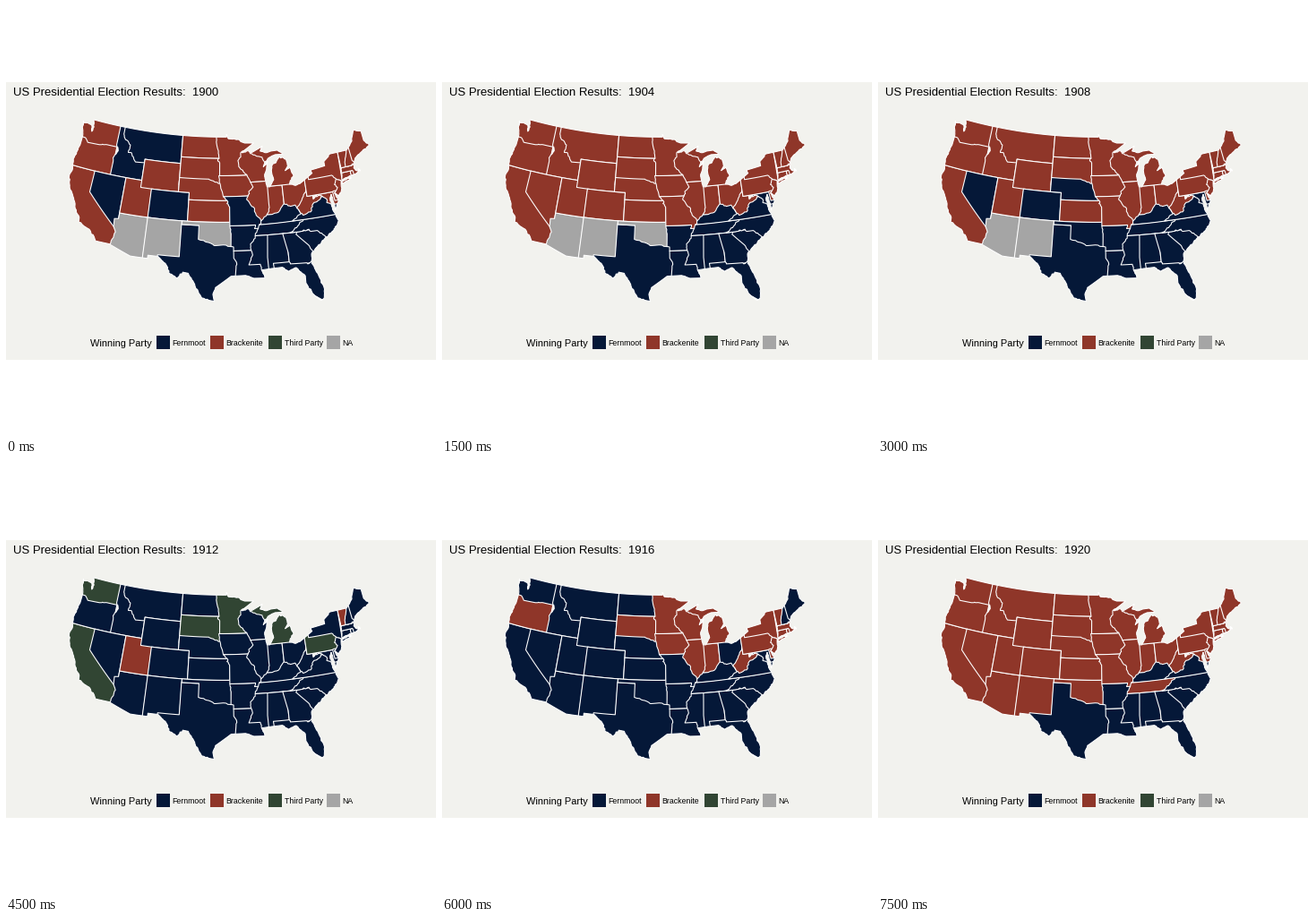
A matplotlib script that plays this animation: 480x480 px, repeating every 8 s.

```python
import numpy as np
import matplotlib.pyplot as plt
from matplotlib.animation import FuncAnimation
from matplotlib.patches import PathPatch, Polygon, Rectangle
from matplotlib.path import Path

SIZE, DPI = 480, 100
PX = 72 / DPI
STEP, HOLD = 500, 3
FIRST, TERM = 1900, 4
BACK = "#f2f2ee"
COLORS = {"D": "#051838", "R": "#8f3629", "T": "#314533", "N": "#a5a5a5"}
EDGE = dict(ec="white", lw=1.07 * PX, joinstyle="round")

# One letter per election, shared by every state that voted the same way.
RESULTS = {
    "DDDDDD": "TX AR LA KY MS AL GA FL SC NC VA",
    "RRRDRR": "OR IA WI IL IN WV DE NJ NY CT RI MA",
    "RRRDDR": "WY ND KS OH NH ME",
    "RRRTRR": "MN SD MI PA",
    "RRRTDR": "WA CA",
    "DRRDDR": "ID MT MO",
    "DRDDDR": "NV CO",
    "NNNDDR": "AZ NM",
    "NNDDDR": "OK",
    "RRDDDR": "NE",
    "RRRRDR": "UT",
    "RRRRRR": "VT",
    "DDDDDR": "TN",
    "RDDDDR": "MD",
}
WINNERS = {code: run for run, codes in RESULTS.items() for code in codes.split()}

rng = np.random.default_rng(4)
plt.rcParams["font.family"] = "Liberation Sans"
fig = plt.figure(figsize=(SIZE / DPI, SIZE / DPI), dpi=DPI, facecolor="white")
ax = fig.add_axes([0, 0, 1, 1])
ax.set_xlim(0, SIZE)
ax.set_ylim(SIZE, 0)
ax.axis("off")
ax.add_patch(Rectangle((0, 85), SIZE, 310, fc=BACK, lw=0))


def albers(west, lat, lat0=30, lat1=40, center=95.85, scale=458.5):
    """Equal-area conic projection from degrees west / north to pixels."""
    s0, s1 = np.sin(np.radians([lat0, lat1]))
    n = (s0 + s1) / 2
    c = 1 - s0 ** 2 + 2 * n * s0
    rho = scale * np.sqrt(c - 2 * n * np.sin(np.radians(lat))) / n
    theta = n * np.radians(center - west)
    return 242 + rho * np.sin(theta), -397.3 + rho * np.cos(theta)


def outline(coords):
    """Project a ring; short slanted edges are rivers or coast and get rough."""
    ring = np.reshape(coords, (-1, 2))
    parts = []
    for a, b in zip(ring, np.roll(ring, -1, axis=0)):
        length = np.hypot(*(b - a))
        count = int(np.ceil(length / 0.3))
        points = a + np.linspace(0, 1, count, endpoint=False)[:, None] * (b - a)
        if length < 2.5 and np.abs(b - a).min() > 0.12:
            points[1:] += rng.normal(0, 0.05, (count - 1, 2))
        parts.append(points)
    return np.column_stack(albers(*np.vstack(parts).T))


def ring_path(coords):
    points = outline(coords)
    return Path(np.vstack([points, points[:1]]), closed=True)


north = (
    122.76, 49, 95.15, 49, 95.1, 49.37, 94.7, 48.75, 93, 48.6, 91.4, 48.07,
    89.6, 48, 92.1, 46.75, 90.8, 46.95, 90.4, 46.55, 87.9, 47.45, 88.4, 46.8,
    87.3, 46.5, 86.1, 46.67, 85, 46.7, 84, 46.05, 85.5, 46.1, 86.9, 45.7,
    87.65, 45.1, 88, 44.55, 87.1, 45.25, 87.9, 43.2, 87.6, 41.7, 87.1, 41.65,
    86.25, 42.6, 86.5, 43.7, 86.2, 44.75, 85.5, 44.95, 84.75, 45.77,
    83.45, 45.25, 83.3, 44.3, 83.9, 43.7, 82.95, 44.07, 82.45, 43, 83.4, 41.75,
    82.3, 41.45, 81.5, 41.6, 78.9, 42.8, 79.05, 43.27, 76.3, 43.5, 76.3, 44.1,
    74.8, 45, 71.5, 45, 70.3, 45.9, 69.23, 47.46, 67.8, 47.07, 67.8, 45.7)
atlantic = (
    67, 44.85, 68.6, 44.3, 70.3, 43.6, 71, 42.3, 70.5, 41.78, 70, 41.8,
    70.2, 42.07, 69.95, 41.7, 71.3, 41.4, 72.9, 41.25, 73.9, 40.8, 74, 40.45,
    74.2, 39.6, 74.9, 38.95, 75.5, 39.55, 75.05, 38.45, 75.95, 37.15, 75.9, 38,
    76.15, 39.4, 76.5, 38.9, 76.3, 37, 75.75, 35.6, 76.6, 34.7, 77.9, 33.95,
    79.1, 33.3, 81.1, 31.9, 81.4, 30.4, 80.55, 28.4, 80.05, 26.8, 80.3, 25.3)
gulf = (
    80.9, 25.15, 81.75, 26, 82.75, 27.8, 82.7, 28.8, 84, 30.1, 85.3, 29.7,
    86.2, 30.35, 88, 30.3, 89.5, 30.2, 89.1, 29.05, 90.9, 29.1, 92.2, 29.55,
    94.5, 29.5, 97, 27.9, 97.35, 27.1, 97.15, 25.96)
south = (
    99.1, 26.4, 100.3, 28.3, 101.4, 29.77, 102.3, 29.88, 103.1, 28.98,
    104.5, 29.6, 105, 30.65, 106.53, 31.78, 108.2, 31.78, 108.2, 31.33,
    111.07, 31.33, 114.82, 32.5)
pacific = (
    117.13, 32.53, 118.4, 33.8, 120.6, 34.55, 120.7, 35.2, 121.9, 36.5,
    122.5, 37.6, 123.7, 38.9, 124.35, 40.4, 124.1, 41.5, 124.5, 42.85, 124, 45,
    124, 46.3, 124.7, 48.38, 122.8, 48.13, 122.5, 47.3, 122.3, 48)
island = (73.9, 40.6, 73.75, 40.8, 72.3, 41.1, 71.9, 41.05, 73.5, 40.58)

land = PathPatch(Path.make_compound_path(
    ring_path(north + atlantic + gulf + south + pacific), ring_path(island)),
    fc="none", zorder=3, **EDGE)
ax.add_patch(land)
states = {}


def area(code, *coords):
    """Lay a state over its neighbours; the land shape trims the coast."""
    shape = ax.add_patch(Polygon(outline(coords), closed=True, **EDGE))
    shape.set_clip_path(land)
    states[code] = shape


def box(code, west, east, low, high):
    area(code, west, high, east, high, east, low, west, low)


# West
box("CA", 126, 114, 32, 42)
box("OR", 126, 116.9, 42, 47)
area("WA", 126, 46.3, 123.4, 46.2, 122.7, 45.65, 120.6, 45.74, 118.98, 46,
     116.9, 46, 116.9, 50, 126, 50)
area("ID", 117.03, 42, 117.03, 43.9, 117.2, 44.4, 116.5, 45.5, 117.04, 46.3,
     117.03, 50, 116, 50, 111.05, 45, 111.05, 42)
area("MT", 116.05, 50, 104.05, 50, 104.05, 45, 111.05, 45, 111.05, 44.5,
     112.8, 44.4, 113.9, 45.6, 114.5, 45.55, 114.35, 46.65, 115.7, 47.45,
     116.05, 48)
area("NV", 120, 42, 114.04, 42, 114.04, 35, 114.63, 35, 120, 39)
area("AZ", 114.04, 37, 109, 37, 109, 31, 115, 31, 114.5, 33.2, 114.15, 34.27,
     114.63, 35, 114.74, 36.1, 114.04, 36.2)
box("UT", 114.04, 109, 37, 42)
box("WY", 111.05, 104.05, 41, 45)
box("CO", 109.05, 102.05, 37, 41)
box("NM", 109.05, 103, 31, 37)

# Plains
box("ND", 104.05, 96, 45.94, 50)
box("SD", 104.05, 96, 42, 45.94)
area("NE", 104.05, 43, 98.5, 43, 97.9, 42.8, 96.4, 42.45, 95, 42, 95, 40,
     102.05, 40, 102.05, 41, 104.05, 41)
box("KS", 102.05, 94.6, 37, 40)
area("TX", 103.05, 36.5, 94, 36.5, 93, 25, 107, 25, 106.62, 32, 103.05, 32)
area("OK", 103, 37, 94.4, 37, 94.4, 33.6, 95.8, 33.85, 97.1, 33.75, 98, 34.1,
     100, 34.56, 100, 36.5, 103, 36.5)
area("MN", 97.23, 50, 97.1, 48, 96.56, 45.94, 96.85, 45.6, 96.45, 45.3,
     96.45, 43.5, 89, 43.5, 89, 50)
area("IA", 96.6, 43.5, 90, 43.5, 90, 40.58, 95.77, 40.58, 96.25, 42,
     96.45, 42.5)
area("AR", 94.62, 36.5, 89, 36.5, 89, 33, 94.04, 33, 94.04, 33.55,
     94.48, 33.65, 94.43, 35.4)
area("MO", 95.77, 40.58, 89, 40.6, 89, 36, 90.35, 36, 90.15, 36.5, 94.62, 36.5,
     94.62, 39.1, 95.1, 39.6, 94.9, 39.8)
area("LA", 94.04, 33, 88.5, 33, 88.5, 28, 94, 28, 93.7, 30.6, 93.55, 31.15,
     94.04, 32)

# Great Lakes and the Ohio valley
area("WI", 92, 46.9, 90.7, 47.1, 86.5, 45.5, 87, 42.5, 90.65, 42.5, 91.22, 43.5,
     92.75, 44.75, 92.88, 45.6, 92.3, 46.1, 92.3, 46.7)
area("IL", 90.65, 42.5, 87, 42.5, 87, 37, 89.15, 37, 90.2, 38.4, 90.15, 38.8,
     91.5, 40.1, 90.95, 40.9, 91.05, 41.2, 90.2, 41.8)
area("IN", 87.53, 41.75, 84.8, 41.75, 84.8, 37.7, 88.05, 37.8, 87.5, 38.75,
     87.53, 39.35)
box("OH", 84.8, 80.5, 38, 42.3)
area("MI", 90.4, 46.55, 88.1, 45.9, 87.65, 45.1, 86.9, 45.4, 87.2, 41.75,
     82.3, 41.72, 82.3, 47.8, 89.4, 47.8, 90.4, 46.8)
area("KY", 89.15, 37, 88.05, 37.8, 87.1, 37.8, 86, 38, 84.82, 39.1, 83.7, 38.65,
     82.85, 38.75, 82, 37.5, 82, 36.5, 89.5, 36.5)

# South
area("TN", 89.5, 36.5, 81.68, 36.6, 81.68, 35, 90.3, 35, 89.7, 36)
area("MS", 90.3, 35, 88, 35, 88, 30, 89.5, 30, 89.73, 31, 91.6, 31,
     90.9, 32.35, 91.15, 33.6)
area("AL", 88.2, 35, 85, 35, 85, 30, 88.4, 30, 88.47, 31.9)
area("GA", 85.6, 35, 83.1, 35, 80.5, 32, 81, 30.5, 85, 30.5, 85, 32.3)
area("FL", 87.6, 31, 85, 31, 84.86, 30.7, 82.2, 30.57, 82.05, 30.4, 81.4, 30.7,
     79, 30.7, 79, 24, 87.5, 30)
area("SC", 83.1, 35, 78, 35.2, 78, 32, 80.9, 32, 81.5, 33, 83.35, 34.7)
area("NC", 81.68, 36.6, 75, 36.6, 75, 33.5, 78.4, 33.7, 79.67, 34.8,
     80.8, 34.82, 81.05, 35.15, 83.1, 35, 84.32, 35, 82.6, 36)
area("VA", 83.68, 36.6, 75, 36.55, 75, 39, 78, 39.5, 81.97, 37.54)
area("MD", 79.48, 39.72, 75, 39.72, 75, 38, 76, 37.95, 77.2, 38.4, 77.05, 38.8,
     77.75, 39.33, 79.48, 39.72)
area("WV", 80.52, 40.64, 80.52, 39.72, 79.48, 39.72, 79.48, 39.2, 78.45, 39.62,
     77.75, 39.33, 78.87, 38.77, 79.65, 38.57, 80.3, 37.5, 81.68, 37.2,
     82.6, 38.3, 81.75, 39.1)

# Northeast
box("PA", 80.52, 74, 39.72, 42.5)
area("DE", 75.79, 39.72, 75.45, 39.82, 75, 39.5, 75, 38.45, 75.7, 38.46)
area("NY", 79.76, 42, 75.35, 42, 74.7, 41.36, 73.9, 41, 74.1, 40.5, 71.5, 40.5,
     71.5, 41.15, 73.65, 41, 73.3, 45.5, 79.76, 45.5)
area("NJ", 74.7, 41.36, 73.9, 41, 73.5, 40.4, 74.5, 38.5, 75.5, 39.5,
     74.75, 40.2, 75.2, 40.65)
area("CT", 73.5, 42.04, 71.8, 42.03, 71.8, 41.2, 73.65, 40.95)
box("RI", 71.8, 71.1, 41.2, 42.02)
area("MA", 73.5, 42.04, 71.38, 42.02, 71.15, 41.3, 69, 41.3, 69, 42.9,
     70.8, 42.9, 71.3, 42.73, 73.27, 42.74)
box("VT", 73.35, 71, 42.73, 45.5)
area("NH", 71.5, 45.1, 72.4, 43.4, 72.47, 42.73, 71.3, 42.73, 70.8, 42.9,
     70, 43, 71, 45.5)
area("ME", 71.08, 45.5, 70.98, 43.4, 70.6, 43, 66, 43, 66, 48, 71, 48)


def label(x, y, text, size):
    return ax.text(x, y, text, size=size * PX, color="black", va="baseline")


title = label(7.8, 100.4, "", 13.15)
label(94, 380.2, "Winning Party", 11)
for x, party, name in [(175.5, "D", "Fernmoot"), (235.3, "R", "Brackenite"),
                       (300.6, "T", "Third Party"), (365.5, "N", "NA")]:
    ax.add_patch(Rectangle((x - 7.5, 368), 15, 15, fc=COLORS[party], lw=0))
    label(x + 10.2, 379.2, name, 8.8)


def draw(frame):
    k = frame // HOLD
    title.set_text(f"US Presidential Election Results:  {FIRST + TERM * k}")
    for code, shape in states.items():
        shape.set_facecolor(COLORS[WINNERS[code][k]])
    return []


anim = FuncAnimation(fig, draw, frames=16, interval=STEP, repeat=True,
                     repeat_delay=0, blit=False)
plt.show()
```
